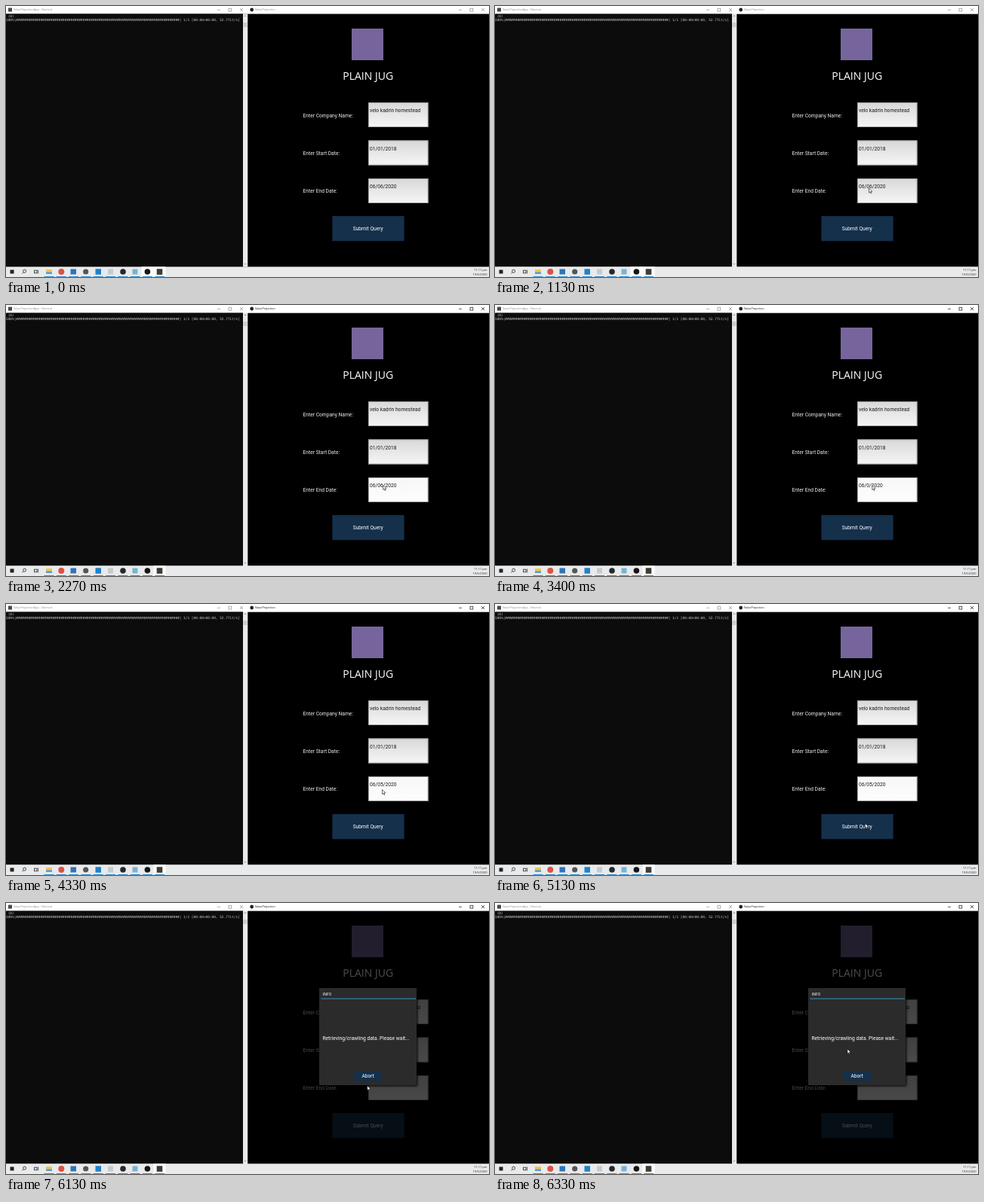
Animation of 640x360 px, one loop 8 s. Source, as an HTML page with a canvas:

```html
<!DOCTYPE html>
<html lang="en">
<head>
<meta charset="utf-8">
<title>Query form</title>
<style>
html, body { margin: 0; width: 100%; height: 100%; overflow: hidden; background: #000; }
canvas { display: block; }
</style>
</head>
<body>
<canvas id="stage" width="640" height="360"></canvas>
<script>
const ctx = document.getElementById('stage').getContext('2d');
const LOOP = 8000, STEP = 1000 / 15;
const UI = 'Roboto, sans-serif', SYSTEM = '"Open Sans", sans-serif';
const MONO = '"DejaVu Sans Mono", monospace';

function rect(x, y, w, h, fill) {
  ctx.fillStyle = fill;
  ctx.fillRect(x, y, w, h);
}

function disc(x, y, r, fill) {
  ctx.fillStyle = fill;
  ctx.beginPath();
  ctx.arc(x, y, r, 0, 7);
  ctx.fill();
}

function line(color, width, ...points) {
  ctx.strokeStyle = color;
  ctx.lineWidth = width;
  ctx.beginPath();
  for (const [x, y] of points) ctx.lineTo(x, y);
  ctx.stroke();
}

function text(str, x, y, font, fill, align = 'left') {
  ctx.font = font;
  ctx.fillStyle = fill;
  ctx.textAlign = align;
  ctx.fillText(str, x, y);
}

const label = (str, x, y, fill = '#eee', align) => text(str, x, y, '6.7px ' + UI, fill, align);

function titleBar(x, w, str, color) {
  rect(x, 0, w, 10.5, '#fff');
  text(str, x + 10, 6.4, '3.7px ' + SYSTEM, color);
  const right = x + w - 8;
  line(color, 0.7, [right - 32, 5.2], [right - 28, 5.2]);
  ctx.strokeRect(right - 17, 3.2, 3.8, 3.8);
  line(color, 0.7, [right - 2, 3], [right + 2, 7]);
  line(color, 0.7, [right + 2, 3], [right - 2, 7]);
}

function consoleWindow() {
  titleBar(0, 320, 'ValueProjectionApp - Shortcut', '#8a8a8a');
  rect(3, 2.5, 5, 5, '#4d4a3c');
  rect(0.4, 10.5, 313.6, 336, '#0c0c0c');
  rect(314, 10.5, 6.5, 336, '#e9e9e9');
  rect(314.3, 22, 5.4, 6, '#cdcdcd');
  line('#666', 0.7, [315.6, 14], [317, 12.6], [318.4, 14]);
  line('#666', 0.7, [315.6, 342], [317, 343.4], [318.4, 342]);
  const font = '4.44px ' + MONO;
  text(' (0)', 0, 14.5, font, '#ccc');
  text('100%|' + '#'.repeat(81) + '| 1/1 [00:00<00:00, 52.77it/s]', 0, 19.7, font, '#ccc');
}

function field(y, value, focused) {
  const shade = ctx.createLinearGradient(0, y, 0, y + 33);
  shade.addColorStop(0, focused ? '#f7f7f7' : '#d8d8d8');
  shade.addColorStop(1, focused ? '#fdfdfd' : '#f6f6f6');
  rect(480, y, 79.5, 33, shade);
  ctx.strokeStyle = '#8c8c8c';
  ctx.lineWidth = 0.8;
  ctx.strokeRect(480.4, y + 0.4, 78.7, 32.2);
  label(value, 482, y + 13, '#1c1c1c');
}

function form(s) {
  rect(320.5, 10.5, 319.5, 336, '#000');
  rect(458, 30, 42, 42, '#75659c');
  text('PLAIN JUG', 479.7, 97.5, 'condensed 14px "Open Sans", sans-serif', '#fff', 'center');

  label('Enter Company Name:', 393.5, 147.5);
  label('Enter Start Date:', 393.5, 197.9);
  label('Enter End Date:', 393.5, 248.3);
  field(128, 'velo kadrin homestead', false);
  field(178.5, '01/01/2018', false);
  field(229, s.date, s.focused);
  if (s.caret) rect(s.caret, 235.5, 0.8, 8, '#ff4d33');

  rect(432.3, 279, 95.4, 33.3, s.pressed ? '#0d4f9a' : '#122a45');
  rect(433, 279.7, 94, 31.9, s.pressed ? '#0f58ab' : '#15304b');
  label('Submit Query', 479.7, 298.3, '#fff', 'center');
}

function popup(dim) {
  rect(320.5, 10.5, 319.5, 336, `rgba(0,0,0,${dim})`);
  ctx.shadowColor = '#000';
  ctx.shadowBlur = 3;
  ctx.shadowOffsetX = ctx.shadowOffsetY = 1;
  rect(415, 113, 129, 129, '#2b2b2b');
  ctx.shadowColor = 'transparent';
  text('INFO', 420, 122.8, '5px ' + UI, '#fff');
  rect(417.5, 126.6, 125.5, 1, '#3a94b8');
  label('Retrieving/crawling data. Please wait...', 477, 181.6, '#fff', 'center');
  rect(461.5, 223.8, 36.5, 12.4, '#122a45');
  rect(462, 224.4, 35.5, 11.2, '#15304b');
  label('Abort', 479.7, 232.4, '#fff', 'center');
}

function taskbar(active) {
  rect(0, 346.4, 640, 13.6, '#e8eaec');
  rect(5.5, 350.5, 5, 5, '#222');
  ctx.strokeStyle = '#222';
  ctx.lineWidth = 0.8;
  ctx.beginPath();
  ctx.arc(24.6, 352.2, 2, 0, 7);
  ctx.stroke();
  line('#222', 0.8, [23.2, 353.7], [21.4, 355.5]);
  ctx.strokeRect(37.6, 351.2, 3.4, 3.6);
  line('#222', 0.7, [42.6, 350.5], [42.6, 355.5]);

  rect(195.5, 346.4, 16, 13.6, '#fbfcfd');
  if (!active) rect(179.5, 346.4, 16, 13.6, '#fbfcfd');
  rect(53, 350, 8, 6, '#f3c64d');
  rect(53, 353.5, 8, 2.5, '#4f9fd8');
  disc(73.3, 353, 4, '#dd5144');
  rect(85.5, 349.5, 7.5, 7, '#2d75b8');
  disc(105.7, 353, 3.6, '#555');
  rect(118.5, 349.3, 7.5, 7.5, '#1f82c9');
  rect(135, 349.5, 7, 7, '#c3cbd1');
  disc(155, 353, 3.8, '#25292e');
  rect(167.5, 349.5, 7, 7, '#77b4d3');
  disc(187.4, 353, 3.8, '#151515');
  rect(199.7, 349.3, 7.6, 7.6, '#3f3c32');
  for (let i = 0; i < 10; i++) rect(50.5 + i * 16.3, 359, 13, 1, '#3b8fce');

  text('11:11 pm', 637.5, 352, '4px ' + SYSTEM, '#222', 'right');
  text('19/6/2020', 637.5, 358, '4px ' + SYSTEM, '#222', 'right');
}

function pointer([x, y]) {
  ctx.beginPath();
  for (const [dx, dy] of [[0, 0], [0, 6], [1.4, 4.8], [2.4, 7], [3.3, 6.6], [2.4, 4.4], [4.3, 4.3]])
    ctx.lineTo(x + dx, y + dy);
  ctx.closePath();
  ctx.fillStyle = '#fff';
  ctx.fill();
  ctx.strokeStyle = '#111';
  ctx.lineWidth = 0.6;
  ctx.stroke();
}

const ramp = (f, a, b) => Math.min(1, Math.max(0, (f - a) / (b - a)));
const smooth = p => p * p * (3 - 2 * p);
const mix = (a, b, p) => a.map((v, i) => v + (b[i] - v) * p);

const START = [89, 324], BEND = [380, 150], FIELD = [495.5, 242];
const CLICK = [499.8, 239.5], BUTTON = [490.5, 291.5], REST = [467, 194];

function pointerAt(f) {
  if (f < 19) {
    const p = smooth(ramp(f, 5, 17));
    return mix(mix(START, BEND, p), mix(BEND, FIELD, p), p);
  }
  if (f < 62) return mix(FIELD, CLICK, smooth(ramp(f, 18, 29)));
  if (f < 89) return mix(CLICK, BUTTON, smooth(ramp(f, 62, 75)));
  return mix(BUTTON, REST, smooth(ramp(f, 89, 95)));
}

// The caret blinks every half second and restarts on each key press.
function caretAt(f) {
  const key = f < 44 ? 27 : f < 53 ? 44 : 53;
  const on = f >= 27 && f < 89 && Math.floor((f - key + 0.5) / 7.5) % 2 === 0;
  return on && (key === 44 ? 495.4 : 499.2);
}

function draw(now) {
  const f = Math.floor((now % LOOP + 5) / STEP);
  const active = f >= 27;
  consoleWindow();
  form({
    date: f < 44 ? '06/06/2020' : f < 53 ? '06/0/2020' : '06/05/2020',
    focused: active && f < 91,
    caret: caretAt(f),
    pressed: f === 89 || f === 90
  });
  if (f >= 89) popup(0.7 * ramp(f, 89, 92));
  titleBar(320, 320, 'ValueProjection', active ? '#111' : '#8a8a8a');
  disc(325.7, 5, 2.4, '#222');
  taskbar(active);
  if (f >= 1) pointer(pointerAt(f));
  requestAnimationFrame(draw);
}
requestAnimationFrame(draw);
</script>
</body>
</html>
```
